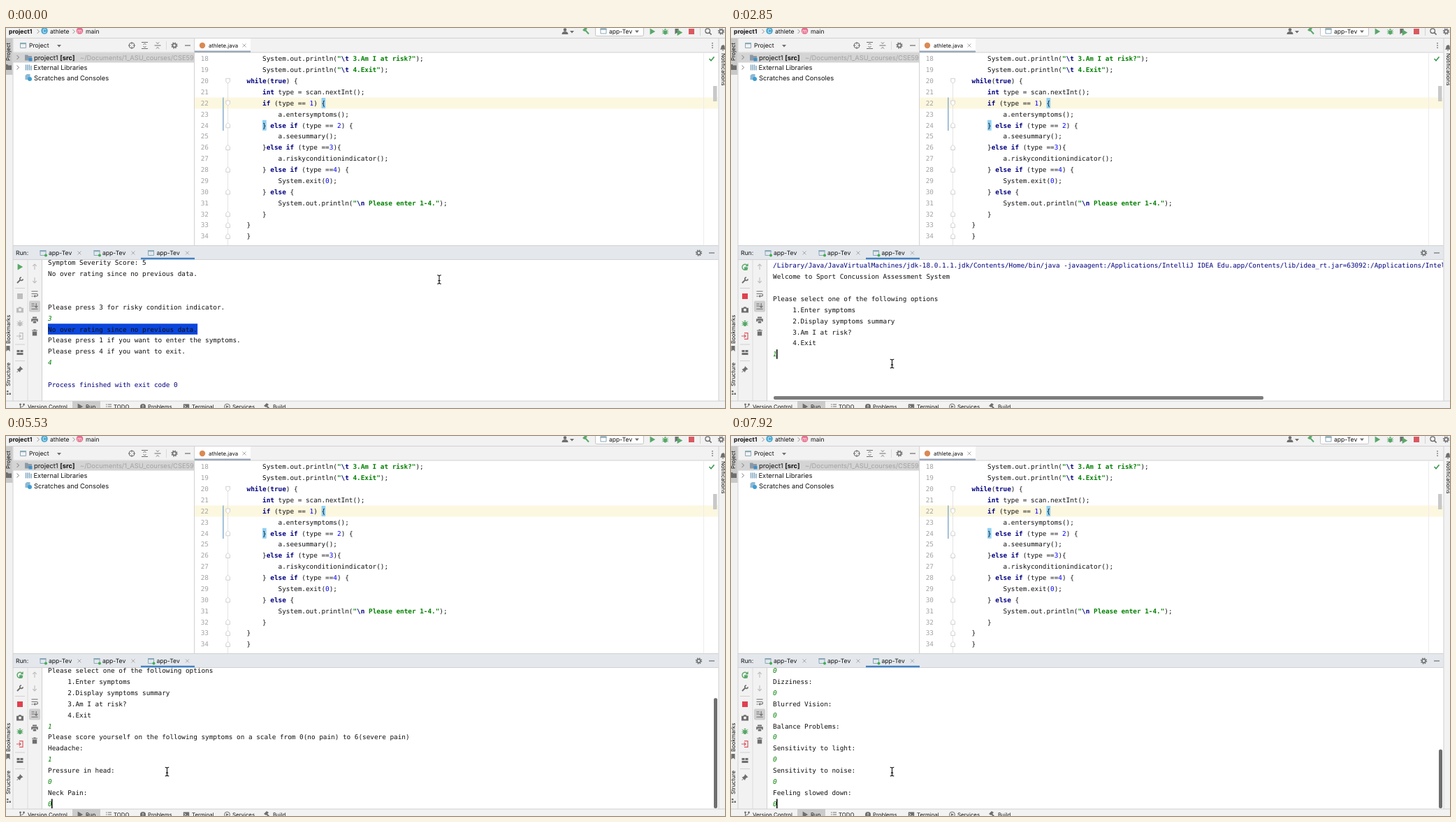
An HTML page that plays this animation: 1029 px wide and 544 px high, repeating every 8 s.

```html
<!DOCTYPE html>
<html lang="en">
<head>
<meta charset="utf-8">
<title>Console session</title>
<style>
html, body { margin: 0; width: 100%; height: 100%; overflow: hidden; background: #fff; }
svg { display: block; width: 100%; height: 100%; }
text { white-space: pre; text-rendering: geometricPrecision; font-family: Inter, sans-serif; fill: #111; }
.mono { font-family: "DejaVu Sans Mono", monospace; font-size: 9.36px; }
.tree { font-size: 9.35px; }
.ui { font-size: 8.6px; }
.small { font-size: 7.8px; }
.b { font-weight: 700; }
.path, .num { fill: #a3a3a3; }
.kw { fill: #000080; font-weight: 700; }
.str { fill: #008000; font-weight: 700; }
.lit { fill: #0000ff; }
.sys { fill: #00007f; }
.in { fill: #007f00; font-style: italic; }
.o { fill: none; }
.f { stroke: none; }
</style>
</head>
<body>
<svg id="stage" viewBox="0 0 1029 544" preserveAspectRatio="none"></svg>
<script>
const LOOP = 8000, ROW = 15.875, CH = 5.635;
const APP = 'app-Tev';
const GREY = '#6e6e6e', PALE = '#bdbdbd', GREEN = '#59a869', RED = '#db5860', BLUE = '#4083c9';
const BAR = '#f2f2f2', EDGE = '#d1d1d1';

const esc = s => s.replace(/&/g, '&amp;').replace(/</g, '&lt;');
const rect = (x, y, w, h, fill, more = '') =>
  `<rect x="${x}" y="${y}" width="${w}" height="${h}" fill="${fill}" ${more}/>`;
// y is the middle of the line of text
const text = (x, y, s, cls, more = '') =>
  `<text x="${x}" y="${y + 3.3}" class="${cls}" ${more}>${s}</text>`;
const turned = (x, y, deg, s) =>
  `<text transform="translate(${x} ${y}) rotate(${deg})" class="small">${s}</text>`;
const group = (id, body, more = '') => `<g id="${id}" ${more}>${body}</g>`;

const line = (d, w = 1) => `<path class="o" stroke-width="${w}" d="${d}"/>`;
const solid = d => `<path class="f" d="${d}"/>`;
const GLYPHS = {
  gear: '<circle class="o" r="2.5" stroke-width="1.5"/><circle class="o" r="3.9" stroke-width="1.5" stroke-dasharray="1.6 1.463"/>',
  minus: line('M-4 0h8', 1.2),
  close: line('M-2.5-2.5l5 5M2.5-2.5l-5 5', .8),
  chevron: line('M-1.5-3l3 3-3 3', .9),
  drop: solid('M-3-1.5h6l-3 3.6z'),
  target: '<circle class="o" r="4"/>' + line('M0-5v3.4M0 5v-3.4M-5 0h3.4M5 0h-3.4'),
  expand: line('M-4.5-4.5h9M-4.5 4.5h9M-2-1l2-2 2 2M-2 1l2 2 2-2'),
  collapse: line('M-4.5 0h9M-2-4.5l2 2 2-2M-2 4.5l2-2 2 2'),
  dots: solid('M-.8-4h1.6v1.6h-1.6zM-.8-.8h1.6v1.6h-1.6zM-.8 2.4h1.6v1.6h-1.6z'),
  check: line('M-3.5 0l2.5 2.8 4.5-5.5', 1.7),
  play: solid('M-3.4-4.5l7.6 4.5-7.6 4.5z'),
  stop: solid('M-4-4h8v8h-8z'),
  rerun: line('M3.2-2.2a4 4 0 1 0 .7 3.5', 1.4) + solid('M4.6-5v4.2h-4.2zM-1 .2h4.5v4.5h-4.5z'),
  wrench: line('M-4 4l4.6-4.6', 2) + line('M2-4a2.2 2.2 0 1 0 2.2 2.4', 1.6),
  camera: solid('M-5-2.8h2.5l1-1.5h3l1 1.5h2.5v6.8h-10z') + '<circle r="2" fill="#f2f2f2" stroke="none"/>',
  bug: solid('M-2.6-1.5h5.2v3q0 3-2.6 3t-2.6-3zM-2-2.2q2-3.4 4 0z') + line('M-4.3-2.4L4.3 3.4M4.3-2.4L-4.3 3.4M-4.5.6h9', .9),
  exit: line('M-1-4.3h5v8.6h-5', 1.2) + line('M-5 0h6M-1.3-2.3l2.3 2.3-2.3 2.3', 1.2),
  layout: solid('M-4.5-3.5h4v3h-4zM.5-3.5h4v3h-4zM-4.5.5h9v3h-9z'),
  pin: solid('M0-4.5l4.5 4.5-2 .5-2 2-.5 2-4.5-4.5 2-.5 2-2z') + line('M-1.5 1.5l-3 3'),
  up: line('M0 4v-8M-2.8-1.2l2.8-2.8 2.8 2.8', 1.1),
  down: line('M0-4v8M-2.8 1.2l2.8 2.8 2.8-2.8', 1.1),
  wrap: line('M-4.5-3.5h9M-4.5 0h7q2 0 2 1.7t-2 1.7h-2.5M-4.5 3.5h2.2', 1.1) + solid('M.8 1.3v4.2l-2.6-2.1z'),
  toEnd: line('M-4.5-3.5h4M-4.5-.5h4M-4.5 3.8h9M2.2-4.5v6M0-.6l2.2 2.2 2.2-2.2', 1.1),
  printer: solid('M-3-4.5h6v2h-6zM-4.8-1.7h9.6v4h-1.8v-1.6h-6v1.6h-1.8zM-2.2 1.6h4.4v2.8h-4.4z'),
  trash: solid('M-4-3.6h2.5v-1h3v1h2.5v1.2h-8zM-3.2-1.6h6.4v6.2h-6.4z'),
  folder: solid('M-5-4h4l1.2 1.5h4.8v6.5h-10z'),
  page: solid('M-3.5-3l2.5-2h4.5v8h-7z'),
  window: solid('M-4.5-4h9v2.2h-9z') + line('M-4-3.5h8v7h-8z'),
  books: line('M-3.5-4v8M-1-4v8M1.5-4v8M4-2.5v6.5', 1.4),
  hammer: line('M-1.5-1.5l5.5 6', 2) + solid('M-5-1l4-4 3 2-4 4z'),
  user: '<circle class="f" cy="-2.4" r="2.3"/>' + solid('M-4.5 4q0-4 4.5-4t4.5 4z'),
  search: '<circle class="o" r="3.3" cx="-.8" cy="-.8" stroke-width="1.3"/>' + line('M1.6 1.6l3 3', 1.5),
  bell: solid('M-4 2.8q1.4-1 1.4-3.5t2.6-3 2.6 3 1.4 3.5zM-1.2 3.4h2.4v1.2h-2.4z'),
  mark: solid('M-2.6-4h5.2v8l-2.6-2.2-2.6 2.2z'),
  blocks: solid('M-3-3h2.5v2.5h-2.5zM.5.5h2.5v2.5h-2.5zM-3 1h2.5v2h-2.5z'),
  list: line('M-4-3h1.5M-4 0h1.5M-4 3h1.5M-1.3-3h5.3M-1.3 0h5.3M-1.3 3h5.3', 1.2),
  info: '<circle class="f" r="4"/><path stroke="#fff" d="M0-2.4v2.8M0 1.4v1"/>',
  ring: '<circle class="o" r="3.9"/>' + solid('M-1.5-2l4 2-4 2z'),
  term: solid('M-4.2-3.6h8.4v7.2h-8.4z') + '<path class="o" stroke="#fff" d="M-2.6-1.8l1.8 1.8-1.8 1.8M.3 2h2.4"/>',
  branch: line('M-2.5-2.5v5M2.5-2.5q0 3-5 3') + '<circle class="f" cx="-2.5" cy="-3" r="1.4"/><circle class="f" cx="2.5" cy="-3" r="1.4"/><circle class="f" cx="-2.5" cy="3" r="1.4"/>',
  foldOpen: '<path fill="#fff" stroke-width=".8" d="M-2.8-3.5h5.6v4.5l-2.8 2.5-2.8-2.5z"/>',
  foldEnd: '<path fill="#fff" stroke-width=".8" d="M-2.8 3.5h5.6v-4.5l-2.8-2.5-2.8 2.5z"/>'
};
const icon = (name, x, y, c = GREY) =>
  `<g transform="translate(${x} ${y})" stroke="${c}" fill="${c}">${GLYPHS[name]}</g>`;
const disc = (x, y, c, s) => `<circle cx="${x}" cy="${y}" r="4.8" fill="${c}"/>` +
  text(x, y - .4, s, 'small', 'text-anchor="middle" style="fill:#fff"');
const appIcon = (x, y) => icon('window', x, y, '#8aa9b8');

function topBar() {
  return rect(0, 0, 1029, 15, BAR) + rect(0, 14, 1029, 1, EDGE) +
    text(4, 4.5, 'project1', 'ui b') + icon('chevron', 46, 5, '#888') +
    disc(55, 4, '#4fa9d0', 'C') + text(63, 4.5, 'athlete', 'ui') + icon('chevron', 97, 5, '#888') +
    disc(105.5, 4, '#e66f8c', 'm') + text(114, 4.5, 'main', 'ui') +
    icon('user', 800, 5) + icon('drop', 810, 5.5) + icon('hammer', 830, 4, GREEN) +
    rect(843.5, -4, 69, 15.5, '#fff', 'rx="2" stroke="#c4c4c4"') + appIcon(855, 4.5) +
    text(863, 4.5, APP, 'ui') + icon('drop', 903, 5) +
    icon('play', 925, 5, GREEN) + icon('bug', 943.5, 5, GREEN) +
    icon('mark', 960, 5, GREY) + icon('play', 964, 6.5, GREEN) + icon('stop', 981, 5, RED) +
    rect(993, 0, 1, 11, EDGE) + icon('search', 1005, 5) + icon('gear', 1023.5, 5);
}

function sideBars() {
  return rect(0, 15, 10, 529, BAR) + rect(9.5, 15, 1, 519, EDGE) + rect(0, 15, 9.5, 52, '#c9c9c9') +
    turned(6, 47, -90, 'Project') + icon('folder', 3, 56) +
    turned(6, 452, -90, 'Bookmarks') + icon('mark', 3, 459) +
    turned(6, 513, -90, 'Structure') + icon('blocks', 4, 522) +
    rect(1019.5, 15, 9.5, 519, BAR) + rect(1019.5, 15, 1, 519, EDGE) +
    icon('bell', 1026, 28) + turned(1023.5, 36, 90, 'Notifications');
}

function projectPane() {
  return rect(10, 15, 259, 20, BAR) + rect(10, 34.5, 259, 1, EDGE) +
    icon('window', 24.5, 25, '#8aa9b8') + text(33, 25, 'Project', 'ui') + icon('drop', 76, 25.5) +
    icon('target', 180, 25) + icon('expand', 198.5, 25) + icon('collapse', 217, 25) +
    rect(229, 19, 1, 12, '#dadada') + icon('gear', 241, 25) + icon('minus', 260, 25) +
    rect(10, 35.5, 259, 14, '#d4d4d4') +
    icon('chevron', 17, 42) + icon('folder', 32, 42.5, '#8b9aa6') + rect(32.5, 43, 5, 4.5, '#3e8fc9') +
    text(40, 42.3, 'project1 <tspan class="b">[src]</tspan>', 'tree') +
    text(106, 42.3, '~/Documents/1_ASU_courses/CSE591', 'tree path', 'clip-path="url(#treeClip)"') +
    icon('chevron', 17, 56.5) + icon('books', 32, 56.5, '#7ba3bd') + text(39.5, 56.7, 'External Libraries', 'tree') +
    icon('page', 31, 71, '#8fb9d4') + '<circle cx="34" cy="73" r="3" fill="#3e9fd4"/>' +
    text(40, 71.2, 'Scratches and Consoles', 'tree') + rect(269, 15, 1, 297, EDGE);
}

const CODE = [
  [4, 'System.out.println("\\t 3.Am I at risk?");'],
  [4, 'System.out.println("\\t 4.Exit");'],
  [0, 'while(true) {'],
  [4, 'int type = scan.nextInt();'],
  [4, 'if (type == 1) {'],
  [8, 'a.entersymptoms();'],
  [4, '} else if (type == 2) {'],
  [8, 'a.seesummary();'],
  [4, '}else if (type ==3){'],
  [8, 'a.riskyconditionindicator();'],
  [4, '} else if (type ==4) {'],
  [8, 'System.exit(0);'],
  [4, '} else {'],
  [8, 'System.out.println("\\n Please enter 1-4.");'],
  [4, '}'], [0, '}'], [0, '}']
];
const span = (cls, s) => `<tspan class="${cls}">${s}</tspan>`;
const highlight = s => s.replace(/("[^"]*")|\b(while|true|if|else|int)\b|\b(\d+)\b/g, (m, str, kw) =>
  str ? span('str', str.replace(/\\[tn]/, e => span('kw', e))) : span(kw ? 'kw' : 'lit', m));

function editor() {
  const rowY = n => 44 + (n - 18) * ROW;
  const brace = (col, n) => rect(344.5 + col * CH, rowY(n) - 7.5, CH, 15, '#8fd0f5');
  let s = rect(270, 15, 750, 20, BAR) + rect(270, 34.5, 750, 1, EDGE) +
    rect(270, 15, 80, 19, '#fff') + rect(270, 32.5, 80, 2.5, '#9ca7b8') +
    '<circle cx="281" cy="25" r="4.2" fill="#d98a55"/>' + text(290, 25, 'athlete.java', 'small') +
    icon('close', 341, 25, '#999') + icon('dots', 1011, 25) +
    rect(270, rowY(22) - 8, 749, 16, '#fcf7df') + rect(998, 35.5, 1, 276, '#ececec') +
    rect(317.2, 75, .8, 236, '#dedede') + rect(310, 99.5, 1.6, 47.5, '#90b4d2') +
    brace(19, 22) + brace(4, 24);
  CODE.forEach(([indent, code], i) => {
    s += text(290, rowY(18 + i), 18 + i, 'mono num', 'text-anchor="end"') +
      text(344.5 + indent * CH, rowY(18 + i), highlight(code), 'mono');
  });
  for (const n of [20, 22]) s += icon('foldOpen', 317.6, rowY(n), '#c4c4c4');
  for (const n of [24, 26, 28, 30, 32, 33, 34]) s += icon('foldEnd', 317.6, rowY(n), '#c4c4c4');
  return s + icon('check', 1010, 44, '#3f9c52') + rect(1012, 83, 5.5, 22, '#c8c8c8');
}

function runHeader() {
  let s = rect(10, 312, 1010, 20, BAR, 'id="head"') + rect(10, 311, 1010, 1, EDGE) +
    rect(10, 331, 1010, 1, EDGE) + text(14, 322, 'Run:', 'ui');
  [53, 130, 207.5].forEach((x, i) => {
    s += appIcon(x, 322) + `<circle cx="${x + 4}" cy="325.5" r="2" fill="#3fae4e" ${i == 2 ? 'id="dot"' : ''}/>` +
      text(x + 8, 322, APP, 'ui') + icon('close', x + 52, 322, '#999');
  });
  return s + rect(193, 328.8, 77, 2.4, BLUE, 'id="under"') + icon('gear', 991.5, 322) + icon('minus', 1010, 322);
}

// 0 finished, 1 starting, 2 running, 3 running with the pane focused
function toolbar(state) {
  const idle = state == 0, full = idle || state == 3, shift = full ? 0 : -19;
  return (idle ? icon('play', 20, 342, GREEN) : icon('rerun', 20, 342, state == 1 ? PALE : GREEN)) +
    icon('wrench', 20, 361) + icon('stop', 20, 384, idle ? PALE : '#e0404f') +
    icon('camera', 20, 403.5, idle ? PALE : GREY) +
    (full ? icon('bug', 20, 422.5, idle ? PALE : GREEN) : '') +
    icon('exit', 20, 441 + shift, idle ? PALE : RED) +
    rect(13, 452.5 + shift, 14, 1, EDGE) + icon('layout', 20, 464.5 + shift) +
    rect(13, 476 + shift, 14, 1, EDGE) + icon('pin', 20, 488.5 + shift) +
    icon('trash', 41, 436, state == 1 ? PALE : GREY);
}

function runTools() {
  return rect(10, 332, 42, 202, BAR) + rect(30.5, 332, 1, 202, '#dcdcdc') + rect(51, 332, 1, 202, EDGE) +
    rect(13, 372, 14, 1, EDGE) + icon('up', 41, 342, PALE) + icon('down', 41, 361, PALE) +
    icon('wrap', 41, 380.5) + rect(33, 390.5, 16, 16, '#cfcfcf', 'rx="2"') + icon('toEnd', 41, 398.5) +
    icon('printer', 41, 418) + [0, 1, 2, 3].map(i => group('tool' + i, toolbar(i))).join('');
}

function bottomBar() {
  const items = [['branch', 23, 31, 'Version Control'], ['play', 106, 114, 'Run'], ['list', 147, 154, 'TODO'],
    ['info', 196, 203, 'Problems'], ['term', 258, 266, 'Terminal'], ['ring', 316.5, 324, 'Services'], ['hammer', 374, 382, 'Build']];
  return rect(0, 534, 1029, 10, BAR) + rect(0, 533.5, 1029, 1, EDGE) + rect(95, 534, 40, 10, '#cbcbcb') +
    items.map(([g, x, tx, s]) => icon(g, x, 542) + text(tx, 542, s, 'small')).join('');
}

const NODATA = 'No over rating since no previous data.';
const OLD = [['Symptom Severity Score: 5'], [NODATA], [''], [''],
  ['Please press 3 for risky condition indicator.'], ['3', 'in'], [NODATA],
  ['Please press 1 if you want to enter the symptoms.'], ['Please press 4 if you want to exit.'],
  ['4', 'in'], [''], ['Process finished with exit code 0', 'sys']];

const START = 690, FIRST_KEY = 2850, FIRST_ENTER = 3030;
// text, time shown, time answered
const PROMPTS = [['Headache:', FIRST_ENTER, 4510], ['Pressure in head:', 4690, 5230], ['Neck Pain:', 5290, 5530],
  ['Nausea or Vomiting:', 5710, 5890], ['Dizziness:', 6060, 6180], ['Blurred Vision:', 6360, 6540],
  ['Balance Problems:', 6720, 6900], ['Sensitivity to light:', 7080, 7200],
  ['Sensitivity to noise:', 7380, 7560], ['Feeling slowed down:', 7740, 7920]];
const LINES = [
  ['/Library/Java/JavaVirtualMachines/jdk-18.0.1.1.jdk/Contents/Home/bin/java -javaagent:/Applications/IntelliJ IDEA Edu.app/Contents/lib/idea_rt.jar=63092:/Applications/IntelliJ', START, 'sys'],
  ...['Welcome to Sport Concussion Assessment System', '', 'Please select one of the following options',
    '     1.Enter symptoms', '     2.Display symptoms summary', '     3.Am I at risk?', '     4.Exit'].map(s => [s, START]),
  ['1', FIRST_KEY, 'in'],
  ['Please score yourself on the following symptoms on a scale from 0(no pain) to 6(severe pain)', FIRST_ENTER],
  ...PROMPTS.flatMap(([s, shown, typed], i) => [[s, shown], [i ? '0' : '1', typed, 'in']])
];

function consolePane() {
  const old = rect(60, 423.3, 38 * CH, 15.5, '#0a45dc') +
    OLD.map(([s, cls = ''], i) => text(60, 336 + i * ROW, s, 'mono ' + cls)).join('');
  const lines = LINES.map(([s, , cls = ''], i) => text(60, 340 + i * ROW, esc(s), 'mono ' + cls, `id="l${i}"`)).join('');
  return rect(52, 332, 967.5, 201.5, '#fff') +
    `<g clip-path="url(#outClip)">${group('old', old)}${group('out', lines + rect(60, 0, 1.5, 13.5, '#000', 'id="caret"'))}</g>` +
    rect(61, 527, 701, 5, '#7d7d7d', 'rx="2" id="hbar"') + rect(1013, 0, 5, 0, '#6f6f6f', 'rx="2" id="vbar"');
}

const BEAM = 'M-2.8-6.2q2.8 0 2.8 1.8v8.8q0 1.8-2.8 1.8M2.8-6.2q-2.8 0-2.8 1.8v8.8q0 1.8 2.8 1.8M-1.6 1.6h3.2';
document.getElementById('stage').innerHTML =
  '<defs><clipPath id="treeClip"><path d="M10 35h259v20H10z"/></clipPath>' +
  '<clipPath id="edClip"><path d="M270 15h750v296H270z"/></clipPath>' +
  '<clipPath id="outClip"><path d="M52 332h967v201.5H52z"/></clipPath></defs>' +
  rect(0, 0, 1029, 544, '#fff') + topBar() + projectPane() + group('ed', editor(), 'clip-path="url(#edClip)"') +
  runHeader() + runTools() + consolePane() + sideBars() + bottomBar() +
  group('mouse', `<path d="${BEAM}" fill="none" stroke="#fff" stroke-width="2.4"/><path d="${BEAM}" fill="none" stroke="#111" stroke-width="1.1"/>`);

const el = id => document.getElementById(id);
const show = (id, on) => { el(id).style.display = on ? '' : 'none'; };
const set = (id, attrs) => { for (const k in attrs) el(id).setAttribute(k, attrs[k]); };

// eased 0..1 in n hard steps, the first at a and the last at b
function steps(t, a, b, n) {
  if (t < a) return 0;
  const p = Math.min(n, 1 + Math.floor((t - a) / (b - a) * (n - 1) + 1e-6)) / n;
  return p * p * (3 - 2 * p);
}

function render(t) {
  const p = steps(t, 360, 770, 6), q = steps(t, 1190, 1650, 9);
  set('mouse', { transform: `translate(${620 - 101.5 * p - 288 * q} ${360 + 23 * p + 97.5 * q})` });

  const running = t >= 520, focused = t < 520 || t >= 1950;
  const state = !running ? 0 : t < 1010 ? 1 : t < 2010 ? 2 : 3;
  for (let i = 0; i < 4; i++) show('tool' + i, i == state);
  show('dot', running);
  show('old', !running);
  show('out', running);
  set('head', { fill: focused ? '#e4e8ed' : '#ececec' });
  set('under', { fill: focused ? BLUE : '#9ca7b8' });

  LINES.forEach(([, at], i) => show('l' + i, t >= at));
  const asked = PROMPTS.filter(r => t >= r[1]).length;
  const last = asked ? 9 + 2 * asked : 8;
  const scroll = Math.max(0, last * ROW - 186.4);
  set('out', { transform: `translate(0 ${-scroll})` });
  set('caret', { x: t >= LINES[last][1] ? 65 : 60, y: 340 + last * ROW - 6.8 });
  show('caret', t >= 2010 && !(t >= 3920 && t < 4390));

  const size = 40200 / ((last + 1) * ROW + 1);
  show('vbar', scroll > 0);
  set('vbar', { y: 533 - size, height: size });
  show('hbar', t >= START);
  set('hbar', { opacity: 1 - steps(t, 2910, 3080, 4) });
}

const tick = now => { render(now % LOOP); requestAnimationFrame(tick); };
render(0);
requestAnimationFrame(tick);
</script>
</body>
</html>
```
